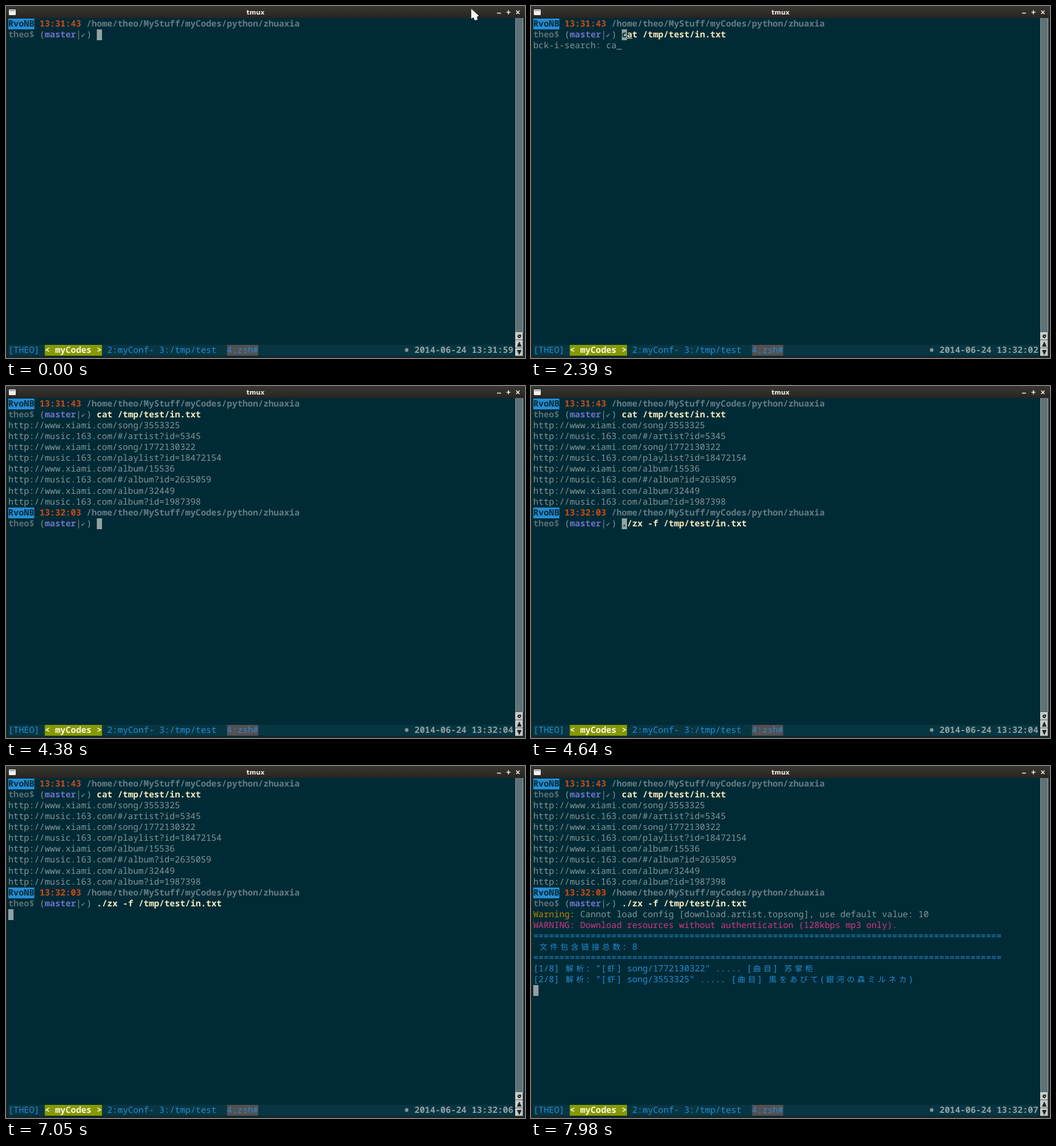
An HTML page that plays this animation: 908x617 px, repeating every 8000 ms.

```html
<!DOCTYPE html>
<html lang="en">
<head>
<meta charset="utf-8">
<title>tmux</title>
<style>
html, body { margin: 0; width: 100%; height: 100%; overflow: hidden; background: #002b36; }
svg { display: block; }
text { white-space: pre; text-rendering: geometricPrecision; font: 15.18px "Noto Sans Mono", "DejaVu Sans Mono", monospace; }
.b { font-weight: 700; }
.wide { font: 13.6px "Noto Sans CJK SC", "Noto Sans CJK JP", "Noto Sans CJK", sans-serif; }
.tick { font: 12px "DejaVu Sans Mono", "DejaVu Sans", sans-serif; }
.title { font: bold 11px "DejaVu Sans", sans-serif; }
</style>
</head>
<body>
<svg id="stage" width="908" height="617" viewBox="0 0 908 617">
  <defs>
    <linearGradient id="bar" x2="0" y2="1">
      <stop offset="0" stop-color="#3a3733"/>
      <stop offset="1" stop-color="#272421"/>
    </linearGradient>
  </defs>
  <rect width="908" height="617" fill="#262421"/>
  <rect x="2" y="21" width="904" height="594" fill="#002b36"/>
  <rect width="908" height="21" fill="url(#bar)"/>
  <rect x="5" y="6" width="12" height="10" rx="1" fill="#f2f1ee"/>
  <rect x="6" y="7" width="10" height="2" fill="#9aa3b4"/>
  <text class="title" x="436.5" y="15" text-anchor="middle" fill="#f0ece4">tmux</text>
  <path d="M859 12.5h7M875.5 11h7M879 7.5v7M892.5 8l6 6M898.5 8l-6 6" stroke="#f0ece4" stroke-width="1.7" fill="none"/>
  <g id="scroll">
    <rect x="891" y="21" width="14" height="551" fill="#5f7276"/>
    <path d="M891.5 21v551" stroke="#8b999b"/>
    <path d="M904.5 21v551" stroke="#a0aaab"/>
  </g>
  <g id="screen"></g>
  <g id="cursor">
    <rect width="9.11" height="19" fill="#93a1a1"/>
    <text class="b" y="14" fill="#002b36"></text>
  </g>
  <path id="mouse" d="M814 5V22L818 20L820 25L825 24L824 19L827 17Z" fill="#f8f8f6"/>
</svg>
<script>
const NS = "http://www.w3.org/2000/svg";
const LOOP = 8000, CELL = 9.11, PITCH = 19.07;
const BLUE = "#268bd2", GREY = "#839496", DIM = "#586e75", DARK = "#002b36";
const CREAM = "#f5e9bd", VIOLET = "#6c71c4", PATH = "#657b83";
const byId = id => document.getElementById(id);
const screen = byId("screen"), cursor = byId("cursor"), mouse = byId("mouse");
const colX = c => 4 + c * CELL;
const rowY = r => Math.round(22 + PITCH * r);
const timed = [];

function add(parent, tag, attrs, text) {
  const el = document.createElementNS(NS, tag);
  for (const k in attrs) el.setAttribute(k, attrs[k]);
  if (text) el.textContent = text;
  return parent.appendChild(el);
}

// A group that is visible from one time up to another.
function span(from, to = LOOP) {
  const g = add(screen, "g", {});
  timed.push({ g, from, to });
  return g;
}

function box(g, row, col, n, fill) {
  add(g, "rect", { x: colX(col), y: rowY(row), width: n * CELL, height: 19, fill });
}

// Writes on the cell grid; wide characters take two cells.
function put(g, row, col, text, fill, cls = "") {
  const y = rowY(row) + 14;
  for (const run of text.match(/[\u3040-\u9fff]+|[^\u3040-\u9fff]+/g)) {
    const wide = run.charCodeAt(0) >= 0x3040;
    const x = wide ? [...run].map((_, i) => colX(col + 2 * i) + 2).join(" ") : colX(col);
    add(g, "text", { x, y, fill, class: wide ? "wide" : cls }, run);
    col += run.length * (wide ? 2 : 1);
  }
}

function prompt(g, row, time) {
  box(g, row, 0, 5, BLUE);
  put(g, row, 0, "RvoNB", DARK, "b");
  put(g, row, 6, time, "#cb4b16", "b");
  put(g, row, 15, "/home/theo/MyStuff/myCodes/python/zhuaxia", PATH, "b");
  put(g, row + 1, 0, "theo$", DIM, "b");
  put(g, row + 1, 6, "(", GREY);
  put(g, row + 1, 7, "master", VIOLET, "b");
  put(g, row + 1, 13, "|", GREY);
  put(g, row + 1, 14, "✔", PATH, "tick");
  put(g, row + 1, 15, ")", GREY);
}

function command(from, to, row, text) {
  put(span(from, to), row, 17, text, CREAM, "b");
}

function search(from, to, typed) {
  const g = span(from, to);
  put(g, 2, 0, "bck-i-search: " + typed + "_", GREY);
  if (typed) add(g, "rect", { x: colX(17), y: rowY(1) + 15, width: typed.length * CELL, height: 1, fill: CREAM });
}

function button(y, glyph) {
  const g = byId("scroll");
  add(g, "rect", { x: 891, y, width: 14, height: 14, fill: "#45494a" });
  add(g, "rect", { x: 891, y, width: 13, height: 13, fill: "#f0f0ee" });
  add(g, "rect", { x: 892, y: y + 1, width: 12, height: 12, fill: "#c4c6c4" });
  add(g, "path", { d: glyph, transform: `translate(898 ${y + 7})`, fill: "#1c2426" });
}

button(572, "M3 -3H-1L-3 -1V1L-1 3H2V1H0L-1 0L0 -1H1V1H3Z");
button(586, "M0 -5L4 4H-4Z");
button(600, "M0 5L4 -4H-4Z");

// Shell session
const CAT = "cat /tmp/test/in.txt", ZX = "./zx -f /tmp/test/in.txt";
const JUMP = "cd ~/MyStuff/myCodes/zx";
prompt(span(0), 0, "13:31:43");
command(2050, 2150, 1, JUMP);
command(2150, LOOP, 1, CAT);
search(1820, 2050, "");
search(2050, 2150, "c");
search(2150, 3170, "ca");

const listing = span(3220);
const XIAMI = "http://www.xiami.com/", MUSIC = "http://music.163.com/";
[
  XIAMI + "song/3553325",
  MUSIC + "#/artist?id=5345",
  XIAMI + "song/1772130322",
  MUSIC + "playlist?id=18472154",
  XIAMI + "album/15536",
  MUSIC + "#/album?id=2635059",
  XIAMI + "album/32449",
  MUSIC + "album?id=1987398"
].forEach((url, i) => put(listing, 2 + i, 0, url, GREY));
prompt(listing, 10, "13:32:03");
command(4470, 4640, 11, CAT);
command(4640, LOOP, 11, ZX);

const report = span(7190), rule = "=".repeat(90);
put(report, 12, 0, "Warning:", "#b58900");
put(report, 12, 9, "Cannot load config [download.artist.topsong], use default value: 10", GREY);
put(report, 13, 0, "WARNING: Download resources without authentication (128kbps mp3 only).", "#d33682");
put(report, 14, 0, rule, BLUE);
put(report, 15, 1, "文件包含链接总数: 8", BLUE);
put(report, 16, 0, rule, BLUE);

const parsed = span(7980);
put(parsed, 17, 0, '[1/8] 解析: "[虾] song/1772130322" ..... [曲目] 苏掌柜', BLUE);
put(parsed, 18, 0, '[2/8] 解析: "[虾] song/3553325" ..... [曲目] 風をあびて(銀河の森ミルネカ)', BLUE);

// Status line
const status = span(0);
box(status, 30, 0, 97, "#073642");
put(status, 30, 0, "[THEO]", BLUE);
box(status, 30, 7, 11, "#859900");
put(status, 30, 7, "< myCodes >", "#fdf6e3", "b");
put(status, 30, 19, "2:myConf- 3:/tmp/test", BLUE);
box(status, 30, 42, 6, "#544f4f");
put(status, 30, 42, "4:zsh#", BLUE);
add(status, "circle", { cx: 701, cy: 603, r: 3.2, fill: GREY });
const clock = add(status, "text", { x: colX(78), y: rowY(30) + 14, fill: "#93a1a1", class: "b" });

const ticks = [420, 1410, 2390, 3220, 4380, 5350, 6350, 7340];
// time, row, column, character under the cursor
const stops = [
  [0, 1, 17, ""], [2050, 1, 17, "c"], [3170, 2, 0, ""], [3220, 11, 17, ""],
  [4470, 11, 17, "c"], [4640, 11, 17, "."], [5210, 11, 41, ""],
  [7050, 12, 0, ""], [7190, 17, 0, ""], [7980, 19, 0, ""]
];

function draw(t) {
  for (const { g, from, to } of timed) g.style.display = t >= from && t < to ? "" : "none";

  const n = ticks.filter(k => t >= k).length;
  clock.textContent = "2014-06-24 13:" + (n ? "32:0" + (n - 1) : "31:59");

  const [, row, col, char] = stops.filter(s => t >= s[0]).pop();
  cursor.setAttribute("transform", `translate(${colX(col)} ${rowY(row)})`);
  cursor.lastElementChild.textContent = char;

  // The pointer leaves through the top edge in four steps.
  const step = t < 150 ? 0 : Math.min(4, 1 + Math.floor((t - 150) / 40));
  mouse.setAttribute("transform", `translate(0 ${-6.5 * step})`);
}

const start = performance.now();
function frame() {
  draw((performance.now() - start) % LOOP);
  requestAnimationFrame(frame);
}
frame();
</script>
</body>
</html>
```
